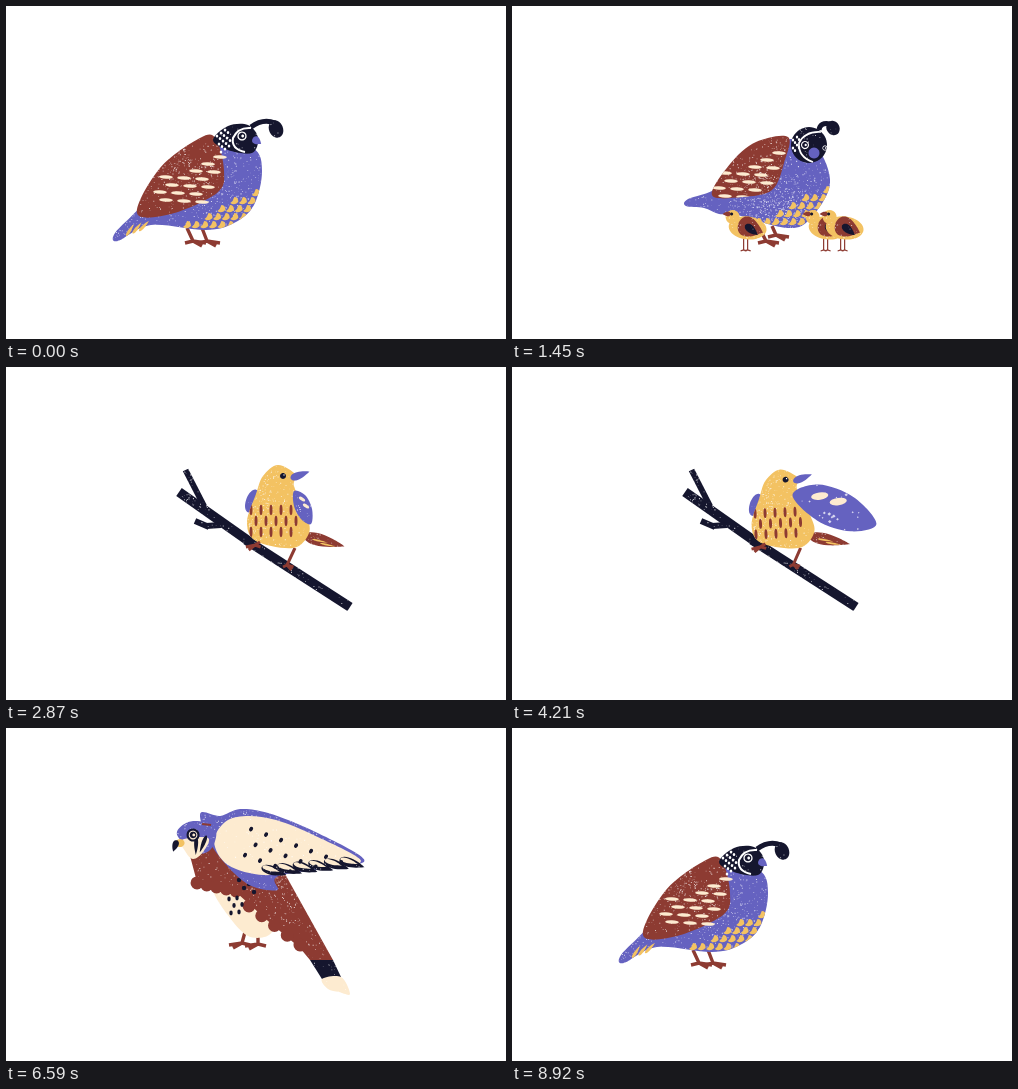
An HTML page with a canvas for the animation above (8.95 s loop, 500 by 333 pixels).

```html
<!DOCTYPE html>
<html lang="en">
<head>
<meta charset="utf-8">
<title>Birds</title>
<style>
html, body { margin: 0; width: 100%; height: 100%; overflow: hidden; background: #fff; }
canvas { display: block; width: 500px; height: 333px; }
</style>
</head>
<body>
<canvas></canvas>
<script>
const BLUE = '#6562c0', RUST = '#8d3b32', NAVY = '#15162e', GOLD = '#f3c262', CREAM = '#fdebd0', WHITE = '#fff';
const LOOP = 8950, { sin, cos, abs, sqrt, hypot, PI } = Math;
const canvas = document.querySelector('canvas'), ctx = canvas.getContext('2d');
const dpr = window.devicePixelRatio || 1;
canvas.width = 500 * dpr;
canvas.height = 333 * dpr;

let seed = 7;
const rnd = () => (seed = seed * 16807 % 2147483647) / 2147483647;
const times = (n, fn) => Array.from({ length: n }, (_, i) => fn(i));
const points = s => s.split(' ').map(p => p.split(',').map(Number));
const mean = (ps, i) => ps.reduce((sum, p) => sum + p[i], 0) / ps.length;
const along = (x1, y1, x2, y2, n) => times(n, i => [x1 + (x2 - x1) * i / (n - 1), y1 + (y2 - y1) * i / (n - 1)]);

// Staggered lattice: steps [ax, ay] along a row and [bx, by] between rows
function grid(x, y, cols, rows, [ax, ay], [bx, by], keep = () => true) {
  const ps = [];
  for (let r = 0; r < rows; r++) for (let c = 0; c < cols; c++) {
    const u = c + r % 2 / 2;
    if (keep(c, r)) ps.push([x + ax * u + bx * r, y + ay * u + by * r]);
  }
  return ps;
}

// Closed Catmull-Rom curve
function curve(ps) {
  const path = new Path2D(), n = ps.length, at = i => ps[(i + n) % n];
  path.moveTo(...ps[0]);
  ps.forEach((b, i) => {
    const a = at(i - 1), c = at(i + 1), d = at(i + 2);
    path.bezierCurveTo(b[0] + (c[0] - a[0]) / 6, b[1] + (c[1] - a[1]) / 6,
      c[0] - (d[0] - b[0]) / 6, c[1] - (d[1] - b[1]) / 6, c[0], c[1]);
  });
  return path;
}

function polygon(ps) {
  const path = new Path2D();
  ps.forEach(p => path.lineTo(...p));
  path.closePath();
  return path;
}

// Print-like specks, denser around a few random centres
function specks(ps, density) {
  const xs = ps.map(p => p[0]), ys = ps.map(p => p[1]), path = new Path2D();
  const x = Math.min(...xs), y = Math.min(...ys), w = Math.max(...xs) - x, h = Math.max(...ys) - y;
  const hubs = times(3, () => [x + rnd() * w, y + rnd() * h]);
  for (let i = w * h * density / 6; i > 0; i--) {
    const hub = hubs[Math.floor(rnd() * 5)], size = 0.3 + rnd() * 0.8;
    const sx = hub ? hub[0] + (rnd() + rnd() - 1) * w * 0.4 : x + rnd() * w;
    const sy = hub ? hub[1] + (rnd() + rnd() - 1) * h * 0.4 : y + rnd() * h;
    path.rect(sx, sy, size, size);
  }
  return path;
}

const shape = (color, ps, grain, make = curve) =>
  ({ color, path: make(ps), x: mean(ps, 0), y: mean(ps, 1), grain: grain && specks(ps, grain) });
const blob = (color, text, grain = 0.4) => shape(color, points(text), grain);
const sharp = (color, text, grain = 0) => shape(color, points(text), grain, polygon);
const turned = (x, y, rot, u, v) => [x + u * cos(rot) - v * sin(rot), y + u * sin(rot) + v * cos(rot)];
const oval = (color, x, y, rx, ry = rx, rot = 0, grain = 0) =>
  shape(color, times(12, i => turned(x, y, rot, rx * cos(i * PI / 6), ry * sin(i * PI / 6))), grain);
// Teardrop with its point towards rot
const leaf = (color, x, y, len, width, rot, grain = 0.25) =>
  shape(color, times(16, i => {
    const a = i * PI / 8;
    return turned(x, y, rot, len * cos(a), width * sin(a) * sin(a / 2));
  }), grain);
const bar = (color, x1, y1, x2, y2, w, grain = 0.3) => {
  const d = w / 2 / hypot(x2 - x1, y2 - y1), nx = (y1 - y2) * d, ny = (x2 - x1) * d;
  return shape(color, [[x1 + nx, y1 + ny], [x2 + nx, y2 + ny], [x2 - nx, y2 - ny], [x1 - nx, y1 - ny]], grain, polygon);
};

function marks(color, ps, rx, ry = rx, rot = 0, inside) {
  const path = new Path2D();
  ps.forEach(([x, y]) => {
    path.moveTo(x + rx * cos(rot), y + rx * sin(rot));
    path.ellipse(x, y, rx, ry, rot, 0, 7);
  });
  return { color, path, x: mean(ps, 0), y: mean(ps, 1), inside: inside && inside.path };
}

const line = (color, d, width, x, y) => ({ color, path: new Path2D(d), width, x, y });
const foot = (x, y, lean, h, d = 1, w = 3.4) =>
  line(RUST, `M${x} ${y}l${lean} ${h}m${-8 * d} 2l${8 * d}-2l${13 * d} 2m${-13 * d}-2l${9 * d} 5`, w, x + lean, y + h);
const eye = (x, y, r, ring = WHITE) => [oval(ring, x, y, r), oval(NAVY, x, y, r * 0.72), oval(ring, x + 0.7, y, r * 0.3)];
const stripes = (x, y, wing) =>
  marks(CREAM, grid(x, y, 3, 7, [-18, -1], [-3, 7.5], (c, r) => c <= r / 1.5), 6.8, 1.7, 0.05, wing);

// Belly feathers below a slanting line
function scallops(body, dx, dy) {
  const path = new Path2D();
  grid(181, 187, 9, 5, [8.6, 0], [0, 8]).forEach(([x, y]) => {
    if (y > 184 + (250 - x) * 0.5) path.addPath(new Path2D(`M${x + dx - 4} ${y + dy + 2}q4 3 8-1q0-5-4-5q-1 4-4 6z`));
  });
  return { color: GOLD, path, inside: body.path, x: 220 + dx, y: 206 + dy };
}

const quailBody = blob(BLUE, '205,132 247,142 256,165 248,199 228,217 200,224 145,219 112,235 109,227 135,200 165,160', 0.5);
const quail = [
  foot(181, 222, 6, 13), foot(196, 222, 5, 13),
  quailBody,
  scallops(quailBody, 0, 0),
  ...times(3, i => leaf(GOLD, 124 + i * 7, 224 - i * 2, 7, 2, -1 + i * 0.1, 0)),
  blob(RUST, '131,207 154,162 194,132 210,133 218,165 211,187 165,208', 0.5),
  stripes(214, 151),
  blob(NAVY, '207,134 222,120 242,119 252,132 246,147 222,144', 0.15),
  marks(WHITE, grid(211, 130, 3, 5, [4, -3], [1, 4]), 1.3, 1.6),
  line(WHITE, 'M245 122Q232 121 227 132Q225 143 239 146', 2, 232, 134),
  ...eye(236, 130, 4.6),
  leaf(BLUE, 251, 135, 5, 5, 0.6, 0),
  line(NAVY, 'M245 121Q257 112 269 117', 5, 257, 116),
  oval(NAVY, 270, 123, 7, 9, -0.4, 0.2)
];

const bentBody = blob(BLUE, '278,133 305,142 318,178 298,213 275,222 225,209 207,208 192,202 174,200 176,193 206,181 230,146', 0.8);
const bentWing = blob(RUST, '200,189 218,158 244,136 276,131 272,157 260,184 230,191', 0.6);
const bentQuail = [
  foot(260, 220, 4, 9), foot(248, 223, 6, 12),
  bentBody,
  scallops(bentBody, 65, -3),
  bentWing,
  stripes(267, 147, bentWing),
  oval(NAVY, 297, 139, 18, 18, 0, 0.15),
  marks(WHITE, grid(281, 134, 2, 4, [4, -3], [0, 4]), 1.2, 1.5),
  line(WHITE, 'M309 126Q293 125 287 137Q286 151 301 156', 1.7, 292, 140),
  ...eye(293, 139, 4), ...eye(313, 142, 2.6),
  oval(BLUE, 302, 147, 5.5),
  line(NAVY, 'M307 124Q308 116 318 118', 5, 311, 119),
  oval(NAVY, 321, 122, 6.5, 7.5, -0.5, 0.1)
];

const chick = [
  ...times(2, i => line(RUST, `M${232 + i * 4} 232v12m-3 1l3-1l3 1`, 1.2, 234, 240)),
  oval(GOLD, 236, 222, 19, 11.5, 0.12, 0.35),
  oval(GOLD, 221, 211, 7, 7, 0, 0.2),
  leaf(RUST, 215, 208, 4, 3, PI, 0),
  leaf(RUST, 239, 222, 13, 13, 0.35, 0.4),
  leaf(NAVY, 240, 224, 8, 5, 0.7, 0.1),
  oval(NAVY, 220, 208, 1.5)
];

const branch = [
  bar(NAVY, 173, 125, 244, 175, 9.5), bar(NAVY, 240, 173, 344, 240, 9.5),
  bar(NAVY, 179.5, 103, 198, 139, 6), bar(NAVY, 189, 154, 203, 160, 6), bar(NAVY, 200, 159, 215, 158, 6)
];
const tail = [
  leaf(RUST, 318, 174, 21, 8, 0.25),
  ...times(2, i => leaf(GOLD, 314 + i * 8, 174 + i * 4, 8, 1.2, 0.22, 0))
];
const songWing = [
  blob(BLUE, '288,124 299,128 306,142 305,157 295,152 288,139', 0.4),
  marks(CREAM, along(296, 132, 300, 139, 2), 3.6, 1.6, 0.6)
];
const songBody = blob(GOLD, '257,109 272,98 290,108 288,119 300,147 303,166 287,181 250,174 241,155 250,127', 0.5);
const songbird = [
  oval(BLUE, 246, 134, 6, 12, 0.35, 0.5),
  foot(289, 181, -8, 17, 0.5, 3),
  songBody,
  leaf(BLUE, 294, 108, 10, 5, -0.35, 0),
  marks(RUST, grid(245, 143, 5, 3, [10, 0], [0, 11]), 1.5, 5.2, 0, songBody),
  oval(NAVY, 277, 109, 3), oval(WHITE, 278, 108, 0.7),
  foot(254, 175, -5, 3, -0.7, 3)
];

const pieces = [
  oval(CREAM, 240, 166, 25),
  leaf(RUST, 252, 132, 29, 18, 0.55, 0.4),
  oval(BLUE, 205, 118, 13, 7, -0.1, 0.5),
  oval(GOLD, 184, 123, 6, 14, -0.2, 0.5),
  leaf(BLUE, 370, 178, 26, 15, -0.62, 0.25),
  leaf(RUST, 428, 230, 32, 20, -0.99, 0.3),
  ...along(217, 125, 334, 200, 2).map(([x, y]) => oval(CREAM, x, y, 5, 3, 0.5)),
  ...along(209, 193, 275, 243, 2).map(([x, y]) => oval(RUST, x, y, 6.5, 3, -0.5, 0.6)),
  ...times(23, i => oval(NAVY, 240 + cos(i * 2.4) * 18 * sqrt(i), 158 + sin(i * 2.4) * 17 * sqrt(i), 4 + rnd(), 3.5, i, 0.2)),
  ...along(291, 167, 317, 194, 2).map(([x, y]) =>
    marks(NAVY, times(3, i => [x + 3.5 * cos(i * 2.1), y + 3 * sin(i * 2.1)]), 4.5))
];

const raptor = [
  foot(239, 204, -3, 11, -1), foot(252, 204, 0, 12, -1),
  blob(CREAM, '207,160 230,160 264,192 263,207 242,208 221,186', 0.15),
  sharp(RUST, '184,128 206,111 250,138 279,146 327,232 304,232 294,220 262,193 232,166 192,158', 0.5),
  marks(RUST, [...along(191, 155, 230, 163, 5), ...along(243, 178, 294, 217, 5)], 6.5),
  sharp(NAVY, '304,232 327,232 335,249 316,251', 0.15),
  blob(CREAM, '316,251 335,249 344,266 333,264 322,261', 0.15),
  marks(NAVY, grid(223, 171, 2, 3, [8, -1], [1, 7]), 1.7, 2.4),
  marks(NAVY, grid(233, 152, 2, 2, [10, 4], [0, 6]), 2.2)
];
const innerWing = blob(CREAM, '208,114 219,94 240,88 270,92 310,108 354,131 336,139 295,140 258,147 222,137', 0.1);
const raisedWing = [
  blob(BLUE, '194,86 214,88 234,81 262,85 310,104 358,131 330,139 272,148 271,162 240,155 207,120', 0.4),
  innerWing,
  ...along(268, 143, 346, 135, 6).flatMap(([x, y]) => [leaf(NAVY, x, y, 13, 6, 0.3, 0.2), leaf(CREAM, x - 3, y - 2, 9, 3, 0.3, 0)]),
  marks(NAVY, grid(245, 101, 7, 3, [15, 5.5], [-3, 13]), 1.8, 2.4, 0.5, innerWing)
];
const raisedHead = [
  blob(BLUE, '171,107 180,95 197,94 210,103 205,121 190,125', 0.5),
  blob(CREAM, '176,112 202,110 197,124 187,131 179,123', 0.1),
  ...times(2, i => leaf(NAVY, 190 + i * 7, 118 - i * 2, 9, 2.6, 1.6 + i * 0.35, 0)),
  ...eye(187, 107, 4.6, CREAM), line(NAVY, 'M181.500 107a5.500 5.500 0 1 1 0 .1', 2, 187, 107),
  oval(GOLD, 174, 115, 4.5, 4, 0, 0),
  leaf(NAVY, 169, 118, 6, 4, 1.9, 0),
  bar(RUST, 196, 96, 205, 97, 2, 0)
];

const folded = [
  foot(241, 203, -4, 11, -1), foot(258, 204, -2, 12, -1),
  sharp(RUST, '270,188 305,194 325,207 359,252 340,248 306,217', 0.3),
  sharp(NAVY, '328,235 345,236 358,251 340,248', 0.15),
  sharp(CREAM, '340,248 358,250 361,257 349,254'),
  blob(CREAM, '202,145 220,148 287,191 282,201 256,206 222,192 206,172', 0.08),
  blob(RUST, '195,103 232,108 226,140 214,157 202,148 194,126', 0.5),
  marks(RUST, along(203, 146, 212, 153, 2), 5),
  leaf(NAVY, 327, 195, 33, 10, 0.3, 0.15),
  leaf(BLUE, 333, 192, 25, 3, 0.5, 0.1),
  blob(BLUE, '215,118 234,98 255,101 287,120 303,156 318,181 292,191 248,174 221,151', 0.55),
  line(NAVY, 'M283 189Q306 189 310 174', 2.2, 302, 186),
  blob(RUST, '219,112 238,102 264,107 290,130 297,148 258,150 228,138', 0.25),
  ...grid(238, 147, 3, 2, [23, 3], [0, 17]).map(([x, y]) => leaf(NAVY, x, y, 7, 4, 0.15, 0.15)),
  marks(NAVY, grid(265, 120, 3, 3, [8, 3], [-2, 6]), 2.6, 1.2, 0.3),
  marks(NAVY, grid(214, 169, 3, 3, [7, 5], [2, 8]), 2.2, 2.6),
  blob(BLUE, '196,89 210,74 229,74 242,87 245,100 218,101', 0.45),
  oval(CREAM, 209, 97, 12, 13, 0, 0.1),
  leaf(GOLD, 203, 87, 7, 3, 2.8, 0),
  ...times(2, i => oval(NAVY, 214 + i * 12, 95, 3 + i * 2, 11 - i, 0.1, 0.1)),
  line(NAVY, 'M198 94Q202 96 206 93', 1.7, 202, 94),
  bar(RUST, 199, 98, 201, 112, 3, 0),
  leaf(NAVY, 195, 96, 5, 3, 1.8, 0)
];

const clamp = x => Math.min(1, Math.max(0, x));
const seg = (t, a, b) => clamp((t - a) / (b - a));
const ease = (t, a, b) => { const x = seg(t, a, b); return x * x * (3 - 2 * x); };

function at(x, y, { dx = 0, dy = 0, r = 0, sx = 1, sy = sx }, fn) {
  ctx.save();
  ctx.translate(x + dx, y + dy);
  ctx.rotate(r);
  ctx.scale(sx, sy);
  ctx.translate(-x, -y);
  fn();
  ctx.restore();
}

function paint(p) {
  ctx.save();
  if (p.inside) ctx.clip(p.inside);
  if (p.width) {
    ctx.strokeStyle = p.color;
    ctx.lineWidth = p.width;
    ctx.stroke(p.path);
  } else {
    ctx.fillStyle = p.color;
    ctx.fill(p.path);
  }
  if (p.grain) {
    ctx.clip(p.path);
    ctx.fillStyle = 'rgba(255,255,255,.75)';
    ctx.fill(p.grain);
  }
  ctx.restore();
}

// k = 0 is whole, k = 1 is fully scattered
function show(parts, k = 0) {
  if (k >= 1) return;
  parts.forEach((p, i) => {
    const a = i * 2.4;
    at(p.x, p.y, { dx: cos(a) * 34 * k, dy: sin(a) * 26 * k, r: k * sin(a * 3) * 1.5, sx: 1 - k }, () => paint(p));
  });
}

function quails(t) {
  if (t < 1180) {
    const m = ease(t, 250, 1150);
    at(190, 225, { dx: 65 * m, dy: -abs(sin(m * PI * 2)) * 14, r: 0.22 * m }, () => show(quail));
  } else if (t < 1950) {
    show(bentQuail, ease(t, 1650, 1950));
  } else if (t > 8250) {
    show(quail, 1 - ease(t, 8250, 8860));
  }
}

function chicks(t) {
  if (t < 600 || t > 1950) return;
  const run = 0.37 * (t - 1450), travel = run < 0 ? run : 60 * (1 - Math.exp(-run / 60));
  [0, 80, 97].forEach((x, i) => {
    const hop = -abs(sin((t - 1450) / (50 + i * 4))) * 3;
    at(236, 222, { dx: x - travel, dy: hop, sx: 1 - ease(t, 1650, 1920) }, () => show(chick));
  });
}

function perch(t) {
  if (t < 1800 || t > 5200) return;
  const grow = ease(t, 1800, 2350) * (1 - ease(t, 4900, 5180));
  const k = Math.max(1 - ease(t, 1850, 2400), ease(t, 4900, 5200));
  const turn = sin(PI * seg(t, 3000, 3890)), reach = sin(PI * seg(t, 3920, 4770));
  at(342, 240, { sx: grow }, () => show(branch));
  at(278, 190, { r: 0.05 * (turn - reach), sy: 1 - 0.05 * (turn + reach), sx: 1 }, () => {
    at(300, 172, { sx: 1 + 0.8 * turn, sy: 1 }, () => show(tail, k));
    show(songbird, k);
    at(290, 126, { r: -0.8 * reach, sx: 1 + 1.6 * reach }, () => show(songWing, k));
  });
}

function scatter(t) {
  if (t < 5000 || t > 5740) return;
  const out = 1 - (1 - seg(t, 5000, 5440)) ** 3, back = seg(t, 5480, 5740) ** 2, k = out * (1 - back);
  if (k <= 0) return;
  const hx = back ? 245 : 265;
  pieces.forEach((p, i) => at(p.x, p.y, {
    dx: (hx - p.x) * (1 - k), dy: (150 - p.y) * (1 - k), r: (1 - k) * sin(i * 2) * 2, sx: k
  }, () => paint(p)));
}

function kestrel(t) {
  if (t < 5520 || t > 8350) return;
  if (t < 5900 || t > 7500) return show(folded, Math.max(1 - ease(t, 5520, 5740), ease(t, 8000, 8350)));
  const open = ease(t, 5900, 6250) * (1 - ease(t, 7250, 7500));
  const beat = sin((t - 6590) / 90), sway = sin((t - 6590) / 180);
  at(245, 215, { r: 0.1 * open * sway }, () => {
    show(raptor);
    at(215, 112, { r: 0.18 * open * beat + (1 - open) * 0.8, sx: 0.6 + 0.4 * open }, () => show(raisedWing));
    show(raisedHead);
  });
}

const start = performance.now();
function frame(now) {
  const t = Math.max(0, now - start) % LOOP;
  ctx.setTransform(dpr, 0, 0, dpr, 0, 0);
  ctx.fillStyle = WHITE;
  ctx.fillRect(0, 0, 500, 333);
  [quails, chicks, perch, scatter, kestrel].forEach(scene => scene(t));
  requestAnimationFrame(frame);
}
frame(start);
</script>
</body>
</html>
```
